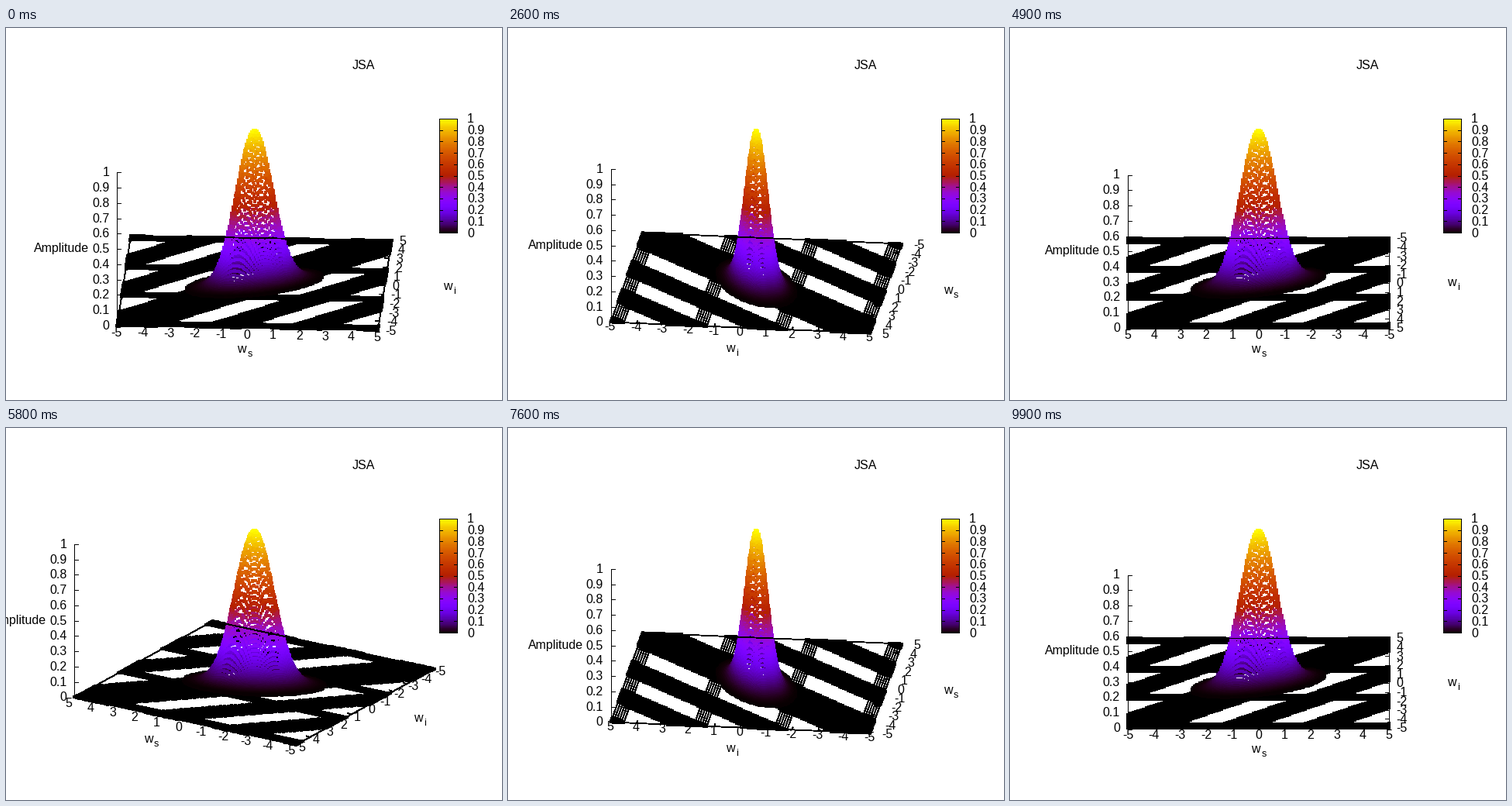
Animation of 640x480 px, one loop 10000 ms. Source, as a matplotlib script:

```python
import numpy as np
import matplotlib.pyplot as plt
from matplotlib.animation import FuncAnimation

W, H, DPI = 640, 480, 100
PX = 72 / DPI
CX, CY = 320.5, 329.0           # screen centre of the base plane
SX, SY, SZ = 33.7, 11.6, 197.5  # pixels per unit along each screen direction
FRAMES = 100
LIM = 5
FLAT = 0.001                    # below this the surface is drawn as floor

plt.rcParams["font.family"] = "Liberation Sans"
fig = plt.figure(figsize=(W / DPI, H / DPI), dpi=DPI, facecolor="white")
ax = fig.add_axes([0, 0, 1, 1])


def palette(v):
    v = np.clip(np.asarray(v, float), 0, 1)
    rgb = [np.sqrt(v), v ** 3, np.sin(2 * np.pi * v)]
    return np.clip(np.stack(rgb, axis=-1), 0, 1)


def project(s, i, c, n):
    return CX + SX * (s * c + i * n), CY + SY * (s * n - i * c)


def label(x=0, y=0, text="", ha="center", size=16):
    return ax.text(x, y, text, ha=ha, va="baseline", fontsize=size * PX)


def segments(xs0, ys0, xs1, ys1):
    gap = np.full(len(xs0), np.nan)
    return (np.stack([xs0, xs1, gap], 1).ravel(),
            np.stack([ys0, ys1, gap], 1).ravel())


def thin(width=1.0, **kw):
    return ax.plot([], [], "k-", lw=width * PX, **kw)[0]


def surface(count):
    """Sample the joint spectral amplitude on a square grid."""
    axis = np.linspace(-LIM, LIM, count)
    s, i = (g.ravel() for g in np.meshgrid(axis, axis))
    q = 2.8 * s ** 2 - 4.3 * s * i + 6.7 * i ** 2
    return s, i, np.exp(-0.5 * q)


# Floor: only the positive lobes show; hill: a finer grid around the peak.
s, i, z = surface(101)
keep = (np.sinc(2 * (s - i) / np.pi) >= 0) & (z < FLAT)
fs, fi = s[keep], i[keep]
s, i, z = surface(201)
keep = z >= FLAT
hs, hi, hz = s[keep], i[keep], z[keep]
hill_rgb = palette(hz)
rows = np.linspace(-LIM, LIM, 101)
rows = rows[np.abs(np.cos(rows)) < 0.3]

# Moving parts
row_lines = thin(1.1, antialiased=False, zorder=1)
floor = ax.plot([], [], "ks", ms=4 * PX, mew=0, antialiased=False, zorder=2)[0]
cone = ax.scatter(np.zeros(len(hs)), np.zeros(len(hs)), s=(4 * PX) ** 2,
                  marker="s", linewidths=0, antialiased=False, zorder=3)
border = thin(0.9, antialiased=False, zorder=4)
ticks = thin(0.9, antialiased=False, zorder=4)
z_axis = thin(snap=True, zorder=4)

units = np.arange(-LIM, LIM + 1)
tenths = np.arange(11) / 10
s_labels = [label(text=str(u)) for u in units]
i_labels = [label(text=str(u)) for u in units]
z_labels = [label(text=f"{t:g}", ha="right") for t in tenths]
z_title = label(text="Amplitude")


def axis_title(sub):
    return label(text="w", ha="left"), label(text=sub, ha="left", size=12.8)


s_title, i_title = axis_title("s"), axis_title("i")

# Fixed parts
label(461.5, 53, "JSA")
L, R, TOP, BOT = 559, 582, 117, 264
ax.imshow(palette(np.linspace(1, 0, 128))[:, None, :], aspect="auto",
          extent=(L, R, BOT, TOP), interpolation="nearest", zorder=2)
ax.plot([L, R, R, L, L], [TOP, TOP, BOT, BOT, TOP], "k-", lw=PX, zorder=3)
for t in tenths:
    y = BOT + (TOP - BOT) * t
    ax.plot([L, L + 4], [y, y], "k-", lw=PX, zorder=3)
    ax.plot([R - 4, R], [y, y], "k-", lw=PX, zorder=3)
    label(595, y + 5.5, f"{t:g}", ha="left")

ax.set_xlim(0, W)
ax.set_ylim(H, 0)
ax.axis("off")


def place_axis(labels, title, xs, ys, out, reach):
    """Put tick labels and the title outside an edge, along direction out."""
    dx, dy = out
    ha = "center"
    if abs(dx) > 0.87:
        ha = "left" if dx > 0 else "right"
    for t, x, y in zip(labels, xs, ys):
        t.set_position((x + reach[0] * dx, y + reach[1] * dy + 5.5))
        t.set_ha(ha)
    x, y = xs[LIM] + 84 * dx - 9, ys[LIM] + 28 * dy + 4
    title[0].set_position((x, y))
    title[1].set_position((x + 13, y + 5))


def draw(k):
    deg = (k + 1) * 360 // FRAMES % 360
    c, n = np.cos(np.radians(deg)), np.sin(np.radians(deg))
    edge_i = LIM if 90 <= deg < 270 else -LIM
    edge_s = LIM if deg < 180 else -LIM

    ends = np.full(len(rows), LIM)
    row_lines.set_data(*segments(*project(-ends, rows, c, n),
                                 *project(ends, rows, c, n)))
    floor.set_data(*project(fs, fi, c, n))

    x, y = project(hs, hi, c, n)
    order = np.argsort(y, kind="stable")
    cone.set_offsets(np.stack([x, y - SZ * hz], 1)[order])
    cone.set_facecolors(hill_rgb[order])

    corner_s = np.array([-1, 1, 1, -1, -1]) * LIM
    corner_i = np.array([-1, -1, 1, 1, -1]) * LIM
    bx, by = project(corner_s, corner_i, c, n)
    border.set_data(bx, by)

    sx, sy = project(units, edge_i, c, n)
    ix, iy = project(edge_s, units, c, n)
    s_out = np.sign(edge_i) * n, abs(c)
    i_out = np.sign(edge_s) * c, abs(n)
    place_axis(s_labels, s_title, sx, sy, s_out, (15, 8.3))
    place_axis(i_labels, i_title, ix, iy, i_out, (9.5, 5))
    ticks.set_data(*segments(
        np.r_[sx, ix], np.r_[sy, iy],
        np.r_[sx - 5 * s_out[0], ix - 5 * i_out[0]],
        np.r_[sy - 3 * s_out[1], iy - 3 * i_out[1]]))

    # The vertical axis stands on the leftmost corner, the nearer one on a tie.
    left = np.lexsort((-by[:4], np.round(bx[:4], 3)))[0]
    zx, zy = bx[left], by[left]
    zxs, zys = np.full(len(tenths), zx), zy - SZ * tenths
    tx, ty = segments(zxs, zys, zxs + 5, zys)
    z_axis.set_data(np.r_[zx, zx, np.nan, tx], np.r_[zy, zy - SZ, np.nan, ty])
    for t, y in zip(z_labels, zys):
        t.set_position((zx - 10, y + 5))
    z_title.set_position((zx - 71.5, zy - SZ / 2 + 4))
    return []


anim = FuncAnimation(fig, draw, frames=FRAMES, interval=100, repeat=True)
plt.show()
```
